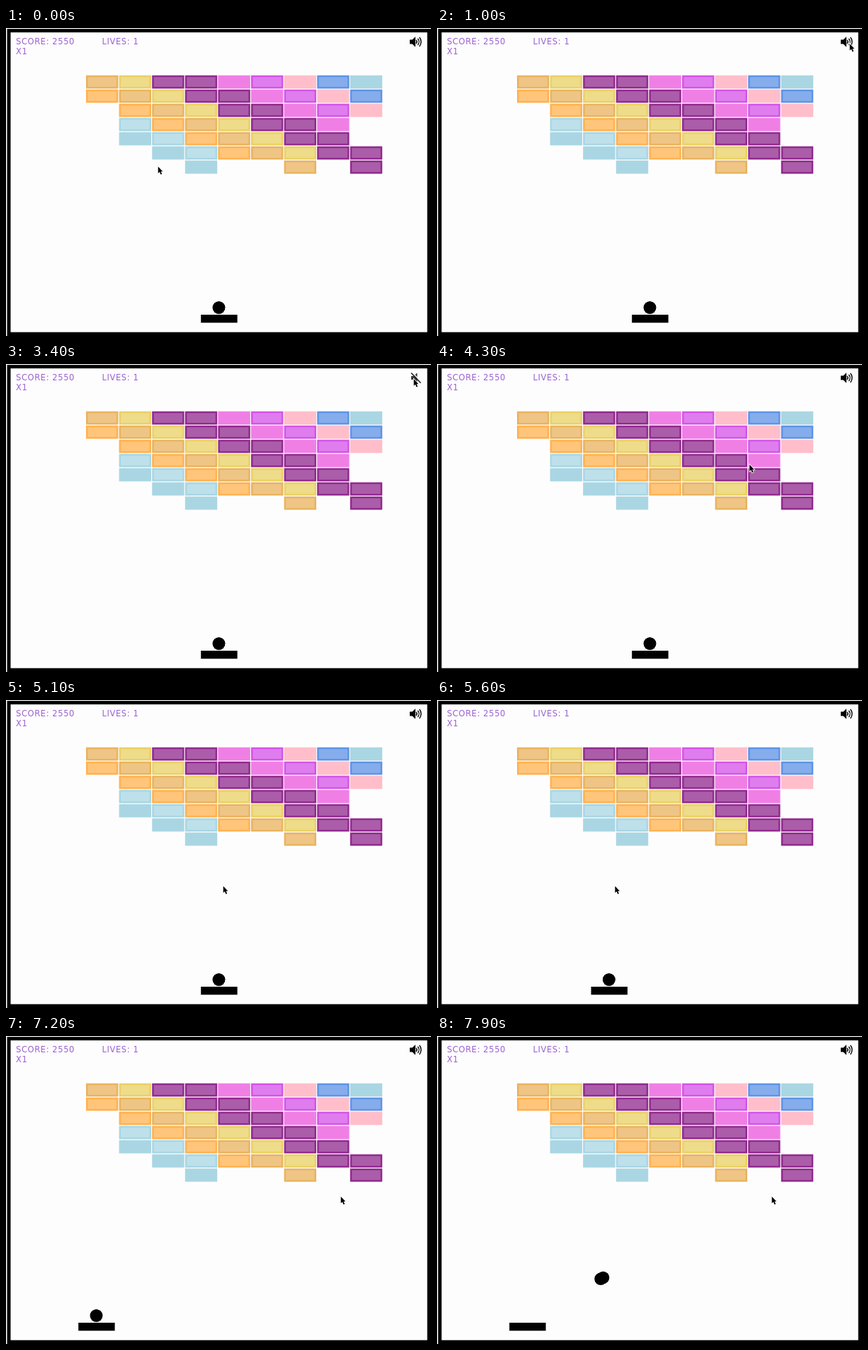
Recreate the animation shown at these times as an HTML page with a canvas. Size 600 by 434 pixels, loop 8000 ms.

```html
<!DOCTYPE html>
<html lang="en">
<head>
<meta charset="utf-8">
<title>Brick breaker</title>
<style>
  html, body { margin: 0; width: 100%; height: 100%; overflow: hidden; background: #fff; }
  canvas { display: block; }
</style>
</head>
<body>
<canvas id="stage" width="600" height="434"></canvas>
<script>
const ctx = document.getElementById('stage').getContext('2d');
const LOOP = 8000, STEP = 100;

// Colours follow the diagonals of the wall; tough bricks have a lighter core.
const COLORS = ['#aad6e3', '#a9d6e3', '#ffb250', '#e9b35f', '#e9d165', '#912a8e',
  '#912a8e', '#f07fe5', '#d554e8', '#ffbeca', '#5f93e6', '#aad6e3'];
const isTough = i => ![0, 7, 9, 11].includes(i);
const WALL = ['#########', '#########', ' ########', ' ####### ', ' ####### ', '  #######', '   #  # #'];

// Pointer moves: from and to (ms), end point, sag of the path.
const MOVES = [
  [0, 200, 293, 186, 0],
  [300, 1000, 582, 22, 0],
  [1900, 2300, 570, 34, 0],
  [3000, 3200, 575, 21, 0],
  [3800, 4800, 306, 262, 0],
  [5300, 6200, 140, 262, 0],
  [6300, 7200, 472, 226, 60],
];

const lerp = (a, b, k) => a + (b - a) * k;
const progress = (t, from, to) => Math.min(1, Math.max(0, (t - from) / (to - from)));

function pointerAt(t) {
  let x = 214, y = 195;
  for (const [from, to, endX, endY, sag] of MOVES) {
    const k = progress(t, from, to);
    x = lerp(x, endX, k);
    y = lerp(y, endY, k) + sag * Math.sin(Math.PI * k);
  }
  return [x, y];
}

function rect(color, x, y, w, h) {
  ctx.fillStyle = color;
  ctx.fillRect(x, y, w, h);
}

function shape(color, path) {
  ctx.fillStyle = color;
  ctx.fill(new Path2D(path));
}

function line(color, width, path) {
  ctx.strokeStyle = color;
  ctx.lineWidth = width;
  ctx.stroke(new Path2D(path));
}

function drawFrame() {
  rect('#fff', 0, 0, 600, 434);
  rect('#000', 1.5, 1.2, 598.5, 432.8);
  rect('#fefdfe', 6.5, 6.2, 588.2, 422.4);
}

function drawWall() {
  WALL.forEach((row, r) => [...row].forEach((cell, c) => {
    if (cell === ' ') return;
    const i = 3 + c - r, x = 113 + c * 46.6, y = 66.7 + r * 20;
    rect(COLORS[i], x, y, 45.4, 18.7);
    if (isTough(i)) rect('rgba(255, 255, 255, .24)', x + 2.5, y + 2.5, 40.4, 13.7);
  }));
}

function drawScore() {
  ctx.font = '11.5px "DejaVu Sans", sans-serif';
  ctx.letterSpacing = '0.6px';
  ctx.fillStyle = '#9a62d0';
  ctx.fillText('SCORE: 2550', 14, 22.7);
  ctx.fillText('LIVES: 1', 135.5, 22.7);
  ctx.fillText('X1', 14, 37);
}

function drawSpeaker(muted) {
  if (muted) {
    shape('#333', 'M572 17h3.5l5-4.5v14l-5-4.5H572z');
    line('#fefdfe', 1.5, 'M573.5 12L586.5 25.5');
    line('#222', 1.6, 'M572 12.5L585.5 26.7');
    return;
  }
  shape('#000', 'M570 16.5h3.5l4.5-4.3v14.6l-4.5-4.3H570z');
  for (const radius of [4, 7, 10]) {
    ctx.beginPath();
    ctx.arc(576, 19.5, radius, -0.7, 0.7);
    ctx.strokeStyle = '#000';
    ctx.lineWidth = 1.4;
    ctx.stroke();
  }
}

function drawPointer([x, y]) {
  ctx.save();
  ctx.translate(x, y);
  const arrow = 'M.7 .3V9.8L2.9 7.8 4.5 11.5 6.2 10.8 4.6 7.2H7.3z';
  line('#fff', 1.6, arrow);
  shape('#000', arrow);
  ctx.restore();
}

function drawBall(x, t) {
  // A ghost one tick behind trails the flying ball.
  for (const lag of [0, 17]) {
    const d = Math.max(0, t - 7365 - lag) * 0.2;
    ctx.fillStyle = '#000';
    ctx.beginPath();
    ctx.arc(x + d, 394 - d / 2, 8.8, 0, 7);
    ctx.fill();
  }
}

function render(t) {
  const paddle = lerp(300.8, 127.8, progress(t, 5300, 6200));
  drawFrame();
  drawWall();
  drawScore();
  drawSpeaker(t >= 1300 && t < 3900);
  rect('#000', paddle - 25.6, 404, 51.4, 11.3);
  drawBall(paddle - 0.3, t);
  drawPointer(pointerAt(t));
}

const start = performance.now();
function tick() {
  const t = (performance.now() - start) % LOOP;
  render(Math.floor(t / STEP) * STEP);
  requestAnimationFrame(tick);
}
tick();
</script>
</body>
</html>
```
